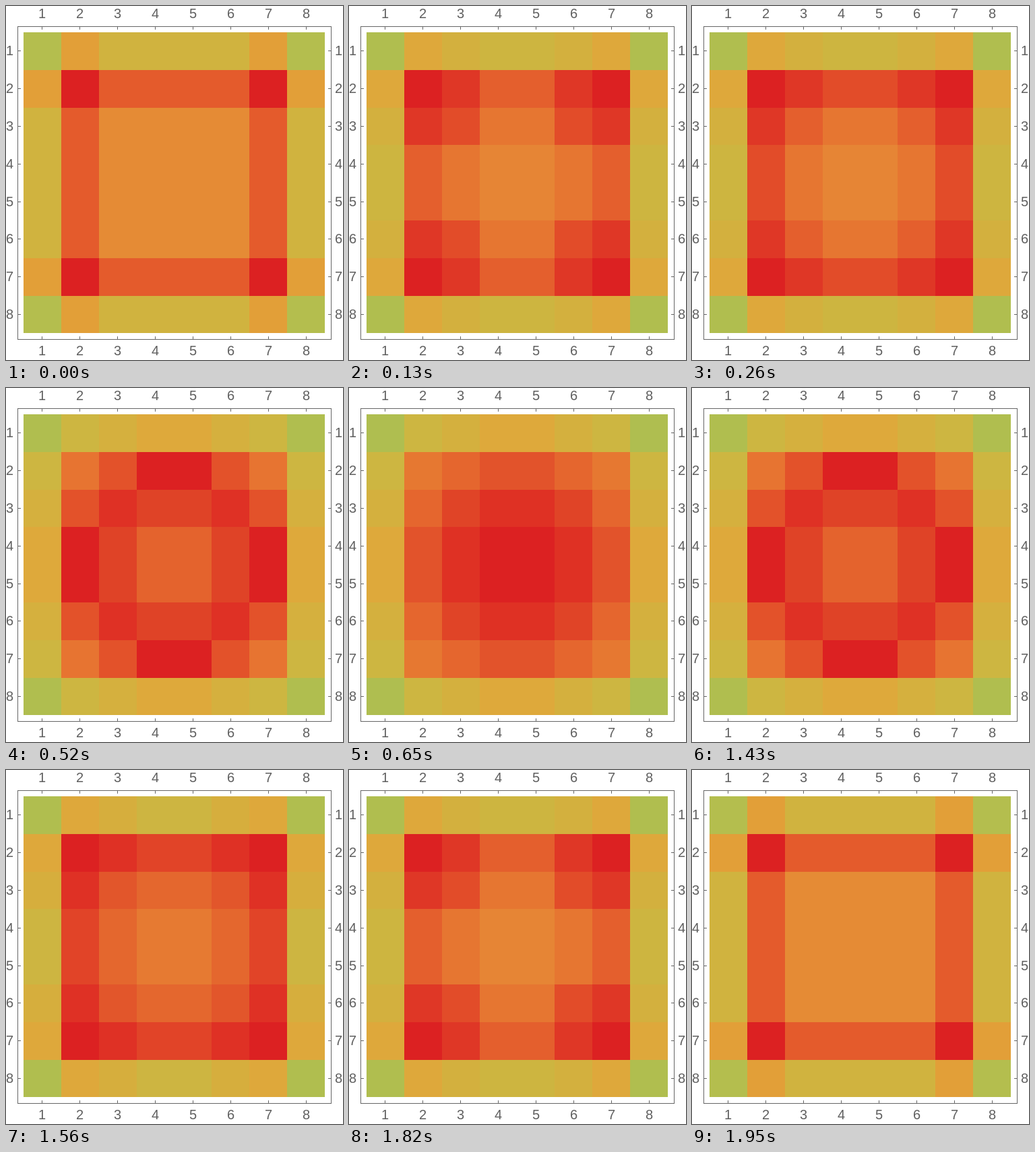
Write an HTML page that moves like this. It is 500 by 525 pixels and loops after 2080 ms.

```html
<!DOCTYPE html>
<html lang="en">
<head>
<meta charset="utf-8">
<title>Matrix plot</title>
<style>
  html, body { margin: 0; width: 100%; height: 100%; overflow: hidden; background: #fff; }
  svg { display: block; }
  text { font: 20px "Liberation Sans", Arial, sans-serif; fill: #606060; text-anchor: middle; }
  .frame { fill: none; stroke: #666; stroke-width: 1; shape-rendering: crispEdges; }
  .cells { shape-rendering: crispEdges; }
</style>
</head>
<body>
<svg id="plot" width="500" height="525" viewBox="0 0 500 525">
  <g class="cells"></g>
  <path class="frame"/>
  <g class="labels"></g>
</svg>
<script>
const NS = 'http://www.w3.org/2000/svg';
const N = 8, STEP = 130, LOOP = 2080;
const svg = document.getElementById('plot');
const cellGroup = svg.querySelector('.cells');
const labelGroup = svg.querySelector('.labels');

// The plot is symmetric, so ten colours fill one pose.
// Order: 11 12 13 14 22 23 24 33 34 44
const poses = [
  'b4be4e e29f38 d0b33f d0b33f dc2122 e45b2c e45b2c e58b35 e58b35 e58b35',
  'b0be4f dea83b d3b03e cdb540 dc2122 df3726 e45f2d e24c29 e67631 e68535',
  'b0be4f dea83b d3b03e cdb540 dc2122 df3726 e24c29 e45f2d e67631 e68535',
  'b0be4f dea83b d6ae3d cdb541 dc2122 df3125 e14428 e2562b e4672e e67a32',
  'b0be4f cdb641 d5b03e dea93b e77431 e3522a dc2122 df3125 df4327 e4632d',
  'afbe50 cdb641 d4b03e dea93b e67831 e5662e e2532b e04427 df3124 dc2122'
].map(row => row.split(' '));

const gridX = i => Math.round(26 + 55.875 * i);
const gridY = i => Math.round(39 + 55.8 * i);

function add(parent, tag, attrs) {
  const el = document.createElementNS(NS, tag);
  for (const key in attrs) el.setAttribute(key, attrs[key]);
  return parent.appendChild(el);
}

function label(x, y, n) {
  add(labelGroup, 'text', { x, y }).textContent = n;
}

// Fold a cell into one eighth of the square and return its colour slot.
function slot(row, col) {
  const r = Math.min(row, N - 1 - row), c = Math.min(col, N - 1 - col);
  const a = Math.min(r, c), b = Math.max(r, c);
  return a * 4 - a * (a - 1) / 2 + b - a;
}

const cells = [];
for (let row = 0; row < N; row++) {
  for (let col = 0; col < N; col++) {
    const x = gridX(col), y = gridY(row);
    const el = add(cellGroup, 'rect', {
      x, y, width: gridX(col + 1) - x, height: gridY(row + 1) - y
    });
    cells.push({ el, slot: slot(row, col) });
  }
}

let path = 'M17.5 30.5H482.5V494.5H17.5Z';
for (let i = 0; i < N; i++) {
  const x = Math.floor(26 + 55.875 * (i + 0.5)) + 0.5;
  const y = Math.floor(39 + 55.8 * (i + 0.5)) + 0.5;
  path += `M${x} 30v5M${x} 495v-5M17 ${y}h5M483 ${y}h-5`;
  label(x, 18, i + 1);
  label(x, 518, i + 1);
  label(5.5, y + 6.5, i + 1);
  label(493.5, y + 6.5, i + 1);
}
svg.querySelector('.frame').setAttribute('d', path);

let shown = -1;
function draw(now) {
  const step = Math.floor(now % LOOP / STEP);
  const pose = Math.min(step, LOOP / STEP - 1 - step, poses.length - 1);
  if (pose !== shown) {
    for (const cell of cells) cell.el.setAttribute('fill', '#' + poses[pose][cell.slot]);
    shown = pose;
  }
}

const start = performance.now();
function tick() {
  draw(performance.now() - start);
  requestAnimationFrame(tick);
}
tick();
</script>
</body>
</html>
```
